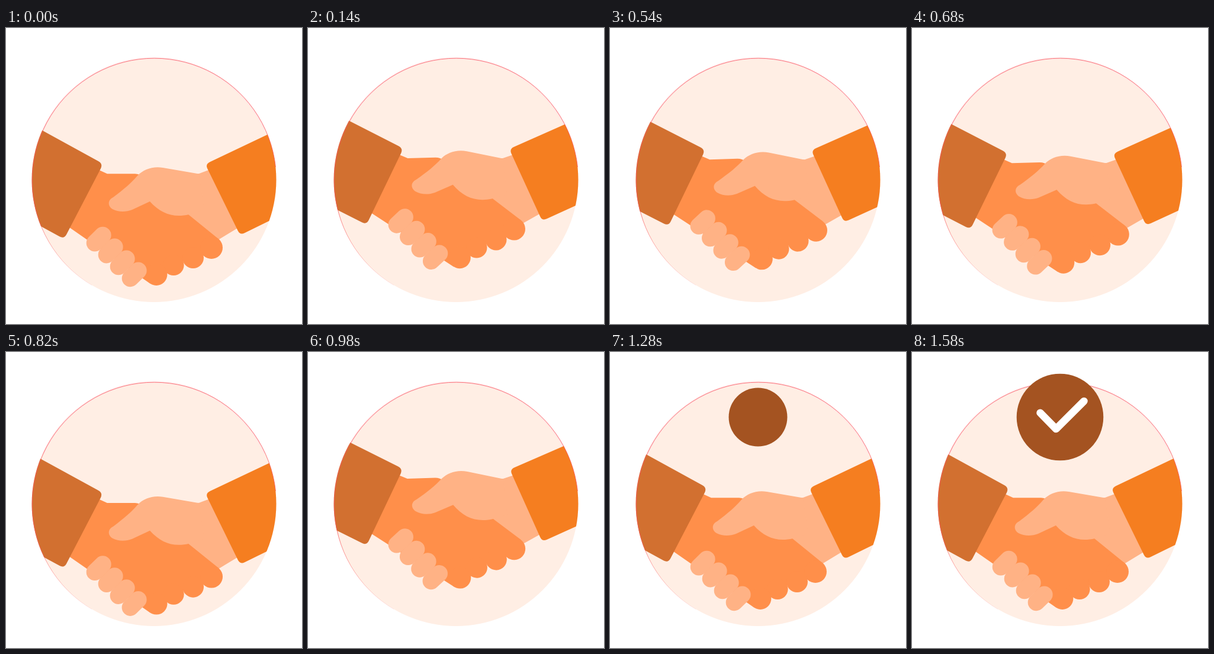
These frames come from a looping animation (500 px wide and 500 px high, 2120 ms). An HTML page:

```html
<!DOCTYPE html>
<html lang="en">
<head>
<meta charset="utf-8">
<title>Handshake</title>
<style>
  html, body { margin: 0; width: 100%; height: 100%; overflow: hidden; background: #fff; }
  svg { display: block; width: 100vw; height: 100vh; }
  .light { fill: #ffb285; }
  .dark { fill: #ff8f4a; }
</style>
</head>
<body>
<svg viewBox="0 0 500 500">
  <clipPath id="disc"><circle cx="250" cy="256.5" r="206.5"/></clipPath>
  <linearGradient id="rim" gradientUnits="userSpaceOnUse" x1="0" y1="300" x2="0" y2="435">
    <stop offset="0" stop-color="#f8525a"/>
    <stop offset="1" stop-color="#f8525a" stop-opacity=".15"/>
  </linearGradient>
  <circle cx="250" cy="256.5" r="206.5" fill="#ffeee4"/>
  <path d="M63 172 A205 205 0 0 1 437 172" fill="none" stroke="#ffe2e6" stroke-width="3" opacity=".6"/>
  <g clip-path="url(#disc)">
    <g class="right light">
      <path d="M265 250 L326 246 L362 232.500 L406 329 L359 357.500 L340 365 L290 310 Z"/>
    </g>
    <g class="left">
      <g class="dark">
        <path d="M140 232 L171 246.300 H218 Q226 246.500 232 251.500 L308 315 L358.900 356.200 L347 371 L254 416.500 L243.500 431.800 L90 325 Z"/>
        <circle cx="347" cy="371" r="19"/>
        <circle cx="316" cy="388" r="18"/>
        <circle cx="283" cy="400.500" r="17.600"/>
        <circle cx="254" cy="416.500" r="18.400"/>
      </g>
      <path fill="#d27030" d="M-20 128.600 L156 225 Q164 229.400 160 237.500 L102 349 Q98 356.300 90.500 352.200 L-20 292 Z"/>
    </g>
    <g class="right">
      <path class="light" d="M326 246.500 L265 236 C248 233 232 239 222.500 249 C211.500 262 199.500 272 181 286 C171 291 172 301 180 306 C190 311.500 203 311 213 307 L243 293 C262 314 283 321 309 315 L335 307 Z"/>
      <g id="fingers" stroke="#ffb285" stroke-width="28.600" stroke-linecap="round"></g>
      <path fill="#f57e20" d="M530 138 L344.500 226.200 Q336.500 230 340.200 237.500 L391.700 342.500 Q395.300 350 403 346.300 L530 284 Z"/>
    </g>
  </g>
  <path d="M145 434.500 A206.200 206.200 0 1 1 455.500 235" fill="none" stroke="url(#rim)" stroke-width=".9" opacity=".85"/>
  <circle id="badge" cx="250" cy="110" r="0" fill="#a45321"/>
  <path id="tick" d="M216.500 102.700 L243.300 130 L290.500 83" pathLength="1" fill="none" stroke="#fff"
    stroke-width="12.500" stroke-linecap="round" stroke-linejoin="round"/>
</svg>
<script>
const LOOP = 2120, STEP = 20, BEAT = 200;
// Arm poses at each beat: [vertical shift, turn amount]
const rest = [0, 0], up = [-30.7, 1], down = [10, 0];
const poses = [rest, up, down, up, down, up, rest];

const $ = s => document.querySelector(s);
const badge = $('#badge'), tick = $('#tick');
const lefts = document.querySelectorAll('.left');
const rights = document.querySelectorAll('.right');

const clamp = x => Math.min(1, Math.max(0, x));
const smooth = x => x * x * (3 - 2 * x);
const progress = (t, from, to) => clamp((t - from) / (to - from));

for (let i = 0; i < 4; i++) {
  const line = document.createElementNS('http://www.w3.org/2000/svg', 'line');
  const x = 163.4 + 20 * i, y = 350 + 19.9 * i;
  const ends = { x1: x, y1: y, x2: x - 13.4, y2: y + 13.2 };
  for (const key in ends) line.setAttribute(key, ends[key]);
  $('#fingers').append(line);
}

function armPose(t) {
  const beat = t / BEAT, i = Math.floor(beat);
  if (i >= poses.length - 1) return rest;
  const k = smooth(beat - i);
  return poses[i].map((v, j) => v + (poses[i + 1][j] - v) * k);
}

function place(groups, y, angle, cx, cy) {
  const move = `translate(0 ${y}) rotate(${angle} ${cx} ${cy})`;
  groups.forEach(g => g.setAttribute('transform', move));
}

function draw(t) {
  const [y, turn] = armPose(t);
  place(lefts, y, -2.15 * turn, 97, 333);
  place(rights, y, 2 * turn, 398, 355);

  const grow = 1 - Math.pow(1 - progress(t, 1200, 1400), 2.2);
  badge.setAttribute('r', 73.3 * grow);

  const drawn = smooth(progress(t, 1380, 1580));
  tick.style.visibility = drawn > 0 ? 'visible' : 'hidden';
  tick.setAttribute('stroke-dasharray', drawn < 1 ? `${drawn} 2` : 'none');
}

const start = performance.now();
function frame() {
  const t = (performance.now() - start) % LOOP;
  draw(Math.floor(t / STEP) * STEP);
  requestAnimationFrame(frame);
}
frame();
</script>
</body>
</html>
```
